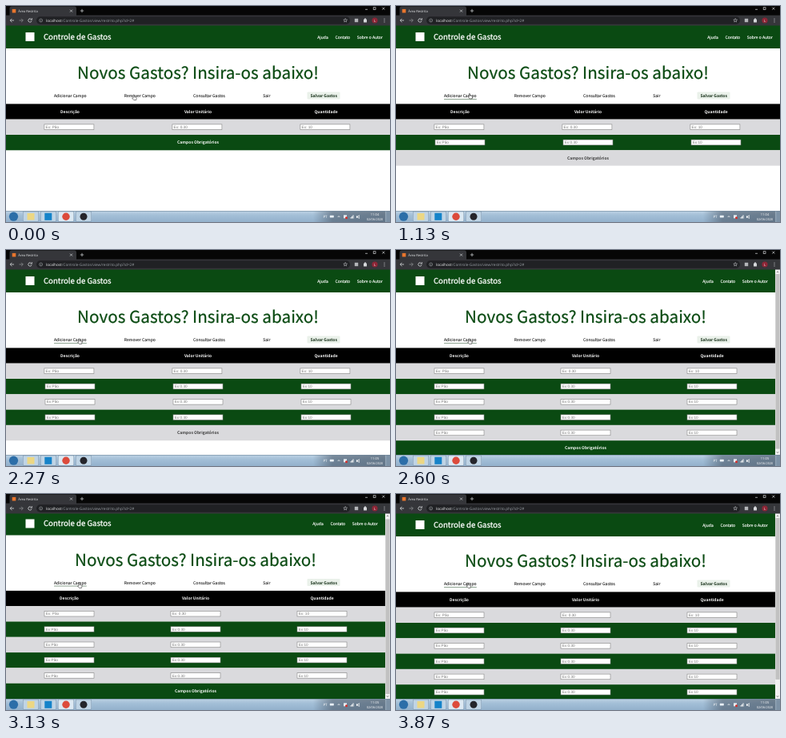
Recreate the animation shown at these times as an HTML page with a canvas. Size 480x270 px, loop 4070 ms.

```html
<!DOCTYPE html>
<html lang="pt">
<head>
<meta charset="utf-8">
<title>Área Restrita</title>
<style>
html, body { margin: 0; width: 100%; height: 100%; overflow: hidden; background: #fff; }
canvas { display: block; width: 480px; height: 270px; }
</style>
</head>
<body>
<canvas id="stage" width="480" height="270"></canvas>
<script>
const g = document.getElementById('stage').getContext('2d');
const LOOP = 4070, STEP = 66.67;
const SITE = '"Noto Sans CJK JP", "Noto Sans CJK SC", "Open Sans", sans-serif';
const UI = '"Open Sans", sans-serif';
const FORM = '"Liberation Sans", Arial, sans-serif';
const GREEN = '#0a4a12', GRAY = '#dadadd', ROW = 19.3, TABLE = 122.4;

// Screen steps at which a table row is added
const ADDED = [17, 21, 31, 38, 50];
const CLOCK_TICK = 21, SCROLLBAR = 38, HOVER = 9;
// [step, value...] tracks, linear in between
const POINTER = [[0, 157.7, 110.6], [1, 141, 121], [2, 123, 127], [3, 123, 127], [7, 103, 117], [10, 90, 109],
  [21, 90, 109], [22, 89.5, 110], [31, 89.5, 110], [33, 89.5, 110.5], [53, 89.5, 110.5], [57, 88, 110.5]];
const SCROLL = [[45, 0], [47, 1.5], [53, 1.5], [57, 0]];

function track(keys, k) {
  let i = keys.findIndex(p => p[0] > k);
  if (i === 0) return keys[0].slice(1);
  if (i < 0) return keys[keys.length - 1].slice(1);
  const a = keys[i - 1], b = keys[i], u = (k - a[0]) / (b[0] - a[0]);
  return a.slice(1).map((v, j) => v + (b[j + 1] - v) * u);
}

function box(x, y, w, h, color) {
  g.fillStyle = color;
  g.fillRect(x, y, w, h);
}

function round(x, y, w, h, r, color) {
  g.fillStyle = color;
  g.beginPath();
  g.roundRect(x, y, w, h, r);
  g.fill();
}

function disc(x, y, r, color) {
  g.fillStyle = color;
  g.beginPath();
  g.arc(x, y, r, 0, 7);
  g.fill();
}

function line(points, color, width = 0.7) {
  g.strokeStyle = color;
  g.lineWidth = width;
  g.beginPath();
  for (let i = 0; i < points.length; i += 2) g.lineTo(points[i], points[i + 1]);
  g.stroke();
}

function gradient(x0, y0, x1, y1, stops) {
  const fill = g.createLinearGradient(x0, y0, x1, y1);
  stops.forEach(([at, color]) => fill.addColorStop(at, color));
  return fill;
}

// Set at ten times the size so that small glyphs keep exact spacing;
// ink is an extra outline in em for weights between regular and bold
function text(s, x, y, size, color, { font = SITE, weight = 400, align = 'left', ink = 0 } = {}) {
  g.save();
  g.translate(x, y);
  g.scale(0.1, 0.1);
  g.font = `${weight} ${size * 10}px ${font}`;
  g.textRendering = 'geometricPrecision';
  g.textAlign = align;
  g.fillStyle = g.strokeStyle = color;
  g.fillText(s, 0, 0);
  if (ink) {
    g.lineWidth = size * 10 * ink;
    g.lineJoin = 'round';
    g.strokeText(s, 0, 0);
  }
  g.restore();
}

const bold = { weight: 700, align: 'center' };
const medium = { ink: 0.03, align: 'center' };

function field(cx, cy, hint) {
  box(cx - 31.3, cy - 3.6, 62.6, 7.2, '#858585');
  box(cx - 30.7, cy - 3, 61.4, 6, '#fff');
  text(hint, cx - 29.3, cy + 1.6, 4.7, '#757575', { font: FORM });
}

function table(rows, width) {
  const cols = [1, 3, 5].map(n => width * n / 6);
  box(0, TABLE, width, ROW, '#000');
  ['Descrição', 'Valor Unitário', 'Quantidade'].forEach((s, i) =>
    text(s, cols[i], TABLE + 11.2, 5, '#fff', bold));
  for (let r = 1; r <= rows + 1; r++) {
    const y = TABLE + r * ROW, dark = r % 2 === 0;
    box(0, y, width, ROW, dark ? GREEN : GRAY);
    if (r > rows) {
      text('Campos Obrigatórios', width / 2, y + 11.2, 5, dark ? '#fff' : '#3a3a3a', bold);
    } else {
      const shift = r === 1 && width === 480 ? -1.1 : 0, gap = r === 1 ? ' ' : '';
      ['Pão', '0.30', '10'].forEach((s, i) => field(cols[i] + shift, y + 9.5, 'Ex:' + gap + s));
    }
  }
}

function page(k, rows, width) {
  box(0, 24, width, 29, GREEN);
  box(24.5, 33, 11, 11, '#fff');
  text('Controle de Gastos', 47, 41.9, 9.6, '#fff', { ink: 0.03 });
  const dx = width - 480;
  text('Ajuda', 396 + dx, 40.8, 5.03, '#fff', medium);
  text('Contato', 420.8 + dx, 40.8, 5.03, '#fff', medium);
  text('Sobre o Autor', 454.8 + dx, 40.8, 5.03, '#fff', medium);
  text('Novos Gastos? Insira-os abaixo!', width / 2, 91.2, 20.7, GREEN, { align: 'center', ink: 0.012 });

  round(376.5, 107.5, 41, 9, 1, '#eaf1ea');
  [['Adicionar Campo', 80.3], ['Remover Campo', 167.3], ['Consultar Gastos', 254], ['Sair', 325.8]]
    .forEach(([s, x]) => text(s, x, 114, 5.05, '#333', medium));
  text('Salvar Gastos', 397.2, 114, 5.05, '#102a12', bold);
  if (k >= HOVER) box(60, 116.2, 40.8, 0.7, '#5f7d63');
  table(rows, width);
}

function scrollbar(rows, top) {
  const view = 231.5, total = TABLE + ROW * (rows + 2) - 24.5;
  box(474, 24, 6, 232, '#f1f1f1');
  const span = 220;
  box(474.4, 30 + span * top / total, 5.2, span * view / total, '#c1c1c1');
  line([475.8, 28.2, 477, 26.8, 478.2, 28.2], '#555');
  line([475.8, 252.3, 477, 253.7, 478.2, 252.3], '#555');
}

function browser() {
  box(0, 0, 480, 12, '#060606');
  round(4.5, 0.4, 83.5, 12, [2.5, 2.5, 0, 0], '#35363a');
  box(0, 11.6, 480, 12.9, '#35363a');
  box(7.7, 3.9, 4.6, 4.6, '#e8762c');
  text('Área Restrita', 15.3, 7.9, 4.1, '#e8eaed', { font: UI });
  const icon = '#d5d7da';
  line([80, 4.6, 83, 7.6], icon);
  line([83, 4.6, 80, 7.6], icon);
  line([92.8, 6, 97.2, 6], icon);
  line([95, 3.8, 95, 8.2], icon);
  line([449, 4.3, 452, 4.3], icon);
  g.strokeRect(459.2, 1.8, 2.8, 2.8);
  line([470.3, 1.7, 473.3, 4.7], icon);
  line([473.3, 1.7, 470.3, 4.7], icon);

  line([10, 18, 5.2, 18], icon, 0.8);
  line([7.4, 15.8, 5.2, 18, 7.4, 20.2], icon, 0.8);
  line([16.5, 18, 21.3, 18], '#8b8d90', 0.8);
  line([19.1, 15.8, 21.3, 18, 19.1, 20.2], '#8b8d90', 0.8);
  g.strokeStyle = icon;
  g.beginPath();
  g.arc(30, 18, 2.2, 0.3, 5.4);
  g.stroke();
  line([32.4, 15.2, 32.4, 17.2, 30.4, 17.2], icon, 0.8);

  round(38, 13.3, 392, 9.4, 4.7, '#202124');
  g.strokeStyle = '#a5a8ac';
  g.lineWidth = 0.6;
  g.beginPath();
  g.arc(43.6, 18, 2, 0, 7);
  g.stroke();
  line([43.6, 17.6, 43.6, 19.2], '#a5a8ac', 0.6);
  text('localhost', 50, 19.8, 4.7, '#f1f3f4', { font: UI });
  text('/Controle-Gastos/view/restrito.php?id=2#', 69.7, 19.8, 4.7, '#9aa0a6', { font: UI });

  const star = [];
  for (let i = 0; i <= 10; i++) {
    const a = i * Math.PI / 5 - Math.PI / 2, r = i % 2 ? 1.1 : 2.5;
    star.push(424.2 + r * Math.cos(a), 18 + r * Math.sin(a));
  }
  line(star, icon, 0.5);
  box(435.8, 15.8, 4.4, 4.4, '#b4b6b9');
  round(447, 16.5, 4, 4, 0.6, icon);
  disc(449, 16.2, 1, icon);
  disc(461, 18, 3.6, '#8d2536');
  text('L', 461, 19.6, 4.3, '#fff', { font: UI, align: 'center' });
  for (const y of [16, 18, 20]) disc(473, y, 0.55, icon);
}

function taskbar(k) {
  box(0, 256, 480, 14, gradient(0, 256, 0, 270, [[0, '#bdd2e4'], [0.4, '#a3bfd7'], [1, '#93b1cc']]));
  box(384, 256, 96, 14, gradient(384, 0, 480, 0,
    [[0, 'rgba(62,74,88,0)'], [0.25, 'rgba(62,74,88,.5)'], [1, 'rgba(62,74,88,.6)']]));
  box(0, 256, 480, 0.6, '#71899f');
  disc(9.5, 263.2, 5.6, '#2c6ea8');
  for (const x of [21, 43, 65, 87]) {
    round(x, 256.8, 20, 12.8, 1, '#7891a8');
    round(x + 0.5, 257.3, 19, 11.8, 0.8, x === 65 ? '#dce9f3' : '#bfd4e5');
  }
  box(26.5, 259, 9, 8.5, '#ecd783');
  box(48.3, 258.8, 9, 9, '#1583c9');
  disc(75, 263.2, 4.7, '#dc4b3c');
  disc(97, 263.2, 4.5, '#25252b');

  text('PT', 399, 264.8, 4.5, '#fff', { font: UI, align: 'center' });
  round(404.8, 261.7, 5, 2.8, 0.4, '#e9f0f6');
  line([414.7, 264, 416, 262.5, 417.3, 264], '#fff');
  box(422, 261.3, 4, 4, '#e7edf3');
  disc(425.5, 264.8, 1.5, '#d42e2a');
  [1.5, 2.8, 4.2].forEach((h, i) => box(430.5 + i * 1.5, 265.6 - h, 1, h, '#fff'));
  box(438, 262.4, 1.6, 2.4, '#fff');
  line([439.5, 263.6, 441.4, 261.5, 441.4, 265.7, 439.5, 263.6], '#fff', 0.6);
  const small = { font: UI, align: 'center' };
  text(k < CLOCK_TICK ? '11:04' : '11:05', 461, 262, 4.1, '#fff', small);
  text('02/06/2020', 461, 268.3, 3.9, '#fff', small);
  box(474.6, 256.6, 5.4, 13.4, '#7d92a6');
  box(474.6, 256.6, 0.5, 13.4, '#c3d2de');
}

const HAND = new Path2D('M1.3 0.6Q2 0 2.5 0.7V3L5 3.5Q5.6 3.8 5.5 4.5L5 7H2.1L0 4.7Q0.2 4 1.3 4.6Z');
const ARROW = new Path2D('M0 0V6.2L1.5 5 2.5 7.1 3.4 6.7 2.5 4.6H4.5Z');

function pointer(k) {
  const [x, y] = track(POINTER, k);
  g.save();
  g.translate(x, y);
  const shape = k < 1 || k >= HOVER ? HAND : ARROW;
  g.fillStyle = '#fff';
  g.strokeStyle = '#222';
  g.lineWidth = 0.55;
  g.fill(shape);
  g.stroke(shape);
  g.restore();
}

function draw(now) {
  const k = Math.floor((now % LOOP + 4) / STEP);
  const rows = 1 + ADDED.filter(s => k >= s).length;
  const scrolls = k >= SCROLLBAR;
  const [top] = track(SCROLL, k);
  box(0, 0, 480, 270, '#fff');
  g.save();
  g.translate(0, -top);
  page(k, rows, scrolls ? 474 : 480);
  g.restore();
  if (scrolls) scrollbar(rows, top);
  browser();
  taskbar(k);
  pointer(k);
}

let start;
function frame(now) {
  start ??= now;
  draw(now - start);
  requestAnimationFrame(frame);
}
requestAnimationFrame(frame);
</script>
</body>
</html>
```
